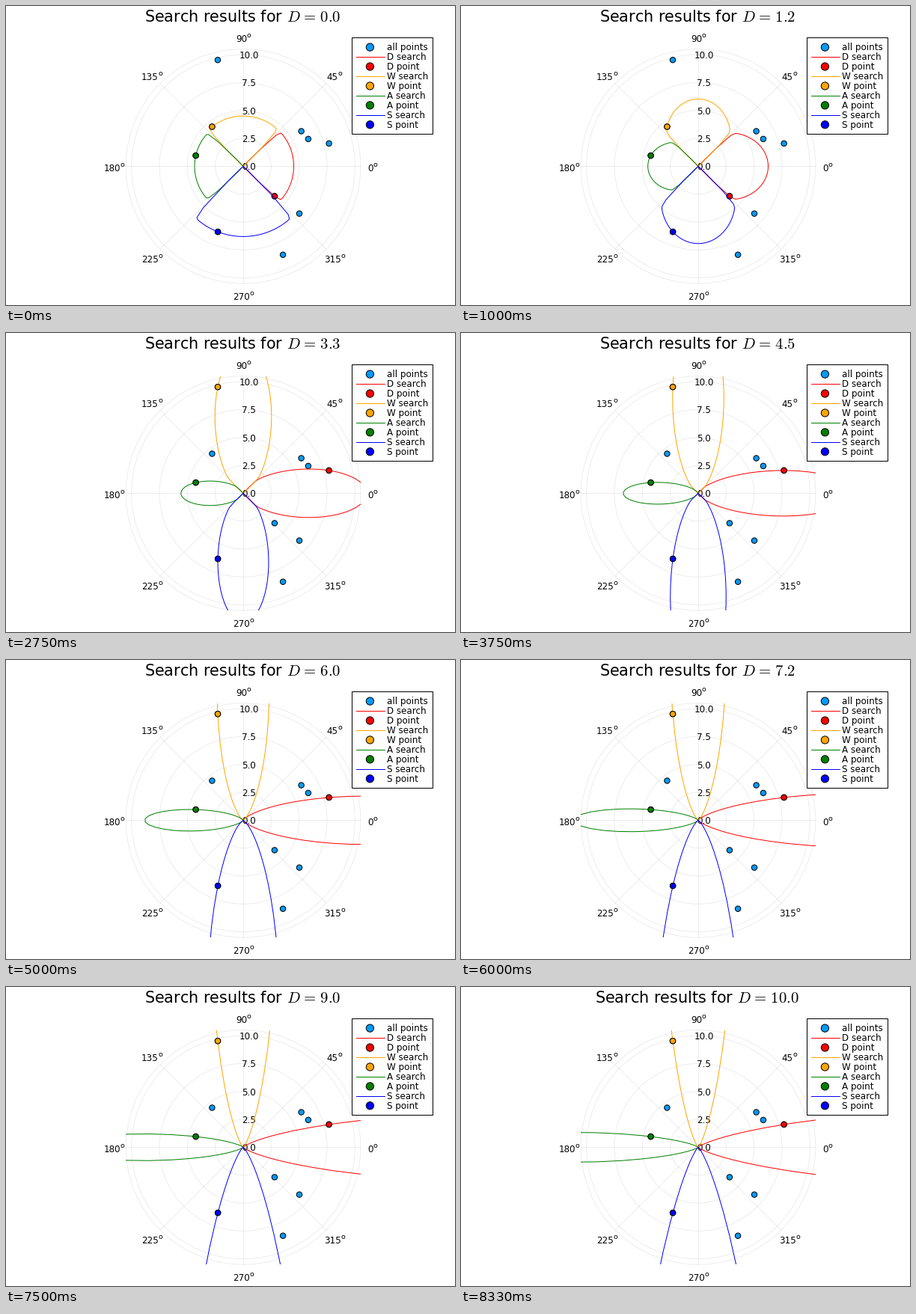
A matplotlib script for the animation above (8410 ms loop, 600 px wide and 400 px high).

```python
import matplotlib.pyplot as plt
import numpy as np
from matplotlib.animation import FuncAnimation
from matplotlib.patches import Circle, Rectangle

plt.rcParams["font.family"] = "DejaVu Sans"
plt.rcParams["mathtext.fontset"] = "cm"

W, H, DPI = 600, 400, 100
PT = 72 / DPI                      # points per pixel
FRAMES, LOOP_MS = 101, 8410

CX, CY, RADIUS = 317.0, 214.4, 156.8
UNIT = RADIUS / 10.5               # pixels per radial unit
SMALL, LARGE = 11.85 * PT, 20.74 * PT
DIGIT = 0.636 * 11.85              # advance of one tick digit
LINE = 1.0 * PT
DOT_R, KEY_R = 3.7, 5.1
EDGE_POWER = 60                    # steepness of the sector border

ALL_COLOR = "#009afa"
SEARCHES = [("D", "#ff0000", 0), ("W", "#ffa500", np.pi / 2),
            ("A", "#008000", np.pi), ("S", "#0000ff", -np.pi / 2)]

# point offsets from the centre, y upwards
POINTS = np.array([(-34.0, 142.2), (-41.6, 52.9), (-63.4, 14.3), (-33.9, -87.7),
                   (53.1, -118.4), (75.0, -63.3), (41.9, -40.0), (86.9, 36.5),
                   (77.6, 46.9), (114.6, 30.5)])
POINT_R = np.hypot(POINTS[:, 0], POINTS[:, 1])
POINT_A = np.arctan2(POINTS[:, 1], POINTS[:, 0])
THETA = np.linspace(0, 2 * np.pi, 200)

fig = plt.figure(figsize=(W / DPI, H / DPI), dpi=DPI, facecolor="white")
ax = fig.add_axes([0, 0, 1, 1])
ax.set_xlim(0, W)
ax.set_ylim(H, 0)
ax.axis("off")


def weight(angle, heading, d):
    """Cost per unit of distance for a direction away from the heading."""
    off = np.abs((angle - heading + np.pi) % (2 * np.pi) - np.pi)
    return np.cosh(d * off) + (off / (np.pi / 4)) ** EDGE_POWER


def place(offset):
    return CX + offset[0], CY - offset[1]


def label(x, y, text, size=SMALL, **kw):
    return ax.text(x, y, text, fontsize=size, va="baseline", **kw)


def dot(center, color, radius, z):
    return ax.add_patch(Circle(center, radius, fc=color, ec="black",
                               lw=1.0 * PT, zorder=z))


def draw_grid():
    style = dict(color="black", alpha=0.08, lw=0.9 * PT, zorder=1)
    for r in (2.5, 5, 7.5, 10, 10.5):
        ax.add_patch(Circle((CX, CY), r * UNIT, fill=False, **style))
    for deg in range(0, 360, 45):
        c, s = np.cos(np.radians(deg)), np.sin(np.radians(deg))
        ax.plot([CX, CX + RADIUS * c], [CY, CY - RADIUS * s], **style)
        digits = len(str(deg))
        x = CX + 1.1 * RADIUS * c - (digits * DIGIT + 5.2) / 2
        y = CY - 1.1 * RADIUS * s + 2
        label(x, y + 4.3, str(deg))
        label(x + digits * DIGIT - 0.6, y - 1.6, "o", SMALL * 0.8)
    for r in (0, 2.5, 5, 7.5, 10):
        label(324.8, CY - r * UNIT + 4.8, f"{r:.1f}", ha="center", zorder=2)


def draw_legend():
    ax.add_patch(Rectangle((462, 42), 108, 129.4, fc="white", ec="black",
                           lw=LINE, zorder=20))
    rows = [("all points", ALL_COLOR)]
    for key, color, _ in SEARCHES:
        rows += [(f"{key} search", color), (f"{key} point", color)]
    for i, (text, color) in enumerate(rows):
        y = 55.1 + 12.96 * i
        if text.endswith("search"):
            ax.plot([468, 505.5], [y, y], color=color, lw=LINE, zorder=21)
        else:
            dot((486.4, y), color, KEY_R, 21)
        label(509.4, y + 4.4, text, zorder=21)


draw_grid()
draw_legend()
for point in POINTS:
    dot(place(point), ALL_COLOR, DOT_R, 3)
title = label(315.7, 20.7, "", LARGE, ha="center")

curves, picks = [], []
for i, (_, color, _) in enumerate(SEARCHES):
    curve, = ax.plot([], [], color=color, lw=LINE, zorder=4 + 2 * i,
                     solid_joinstyle="round")
    frame_box = Rectangle((CX - RADIUS, CY - RADIUS), 2 * RADIUS, 2 * RADIUS,
                          transform=ax.transData)
    curve.set_clip_path(frame_box)
    curves.append(curve)
    picks.append(dot((CX, CY), color, DOT_R, 5 + 2 * i))


def update(i):
    d = i / 10
    title.set_text(rf"Search results for $D\hspace{{0.116}}=\hspace{{0.116}}{d:.1f}$")
    for (_, _, heading), curve, pick in zip(SEARCHES, curves, picks):
        cost = POINT_R * weight(POINT_A, heading, d)
        best = np.argmin(cost)
        r = cost[best] / weight(THETA, heading, d)
        curve.set_data(CX + r * np.cos(THETA), CY - r * np.sin(THETA))
        pick.set_center(place(POINTS[best]))
    return [title, *curves, *picks]


anim = FuncAnimation(fig, update, frames=FRAMES, interval=LOOP_MS / FRAMES,
                     repeat=True, repeat_delay=0, blit=False)
plt.show()
```
